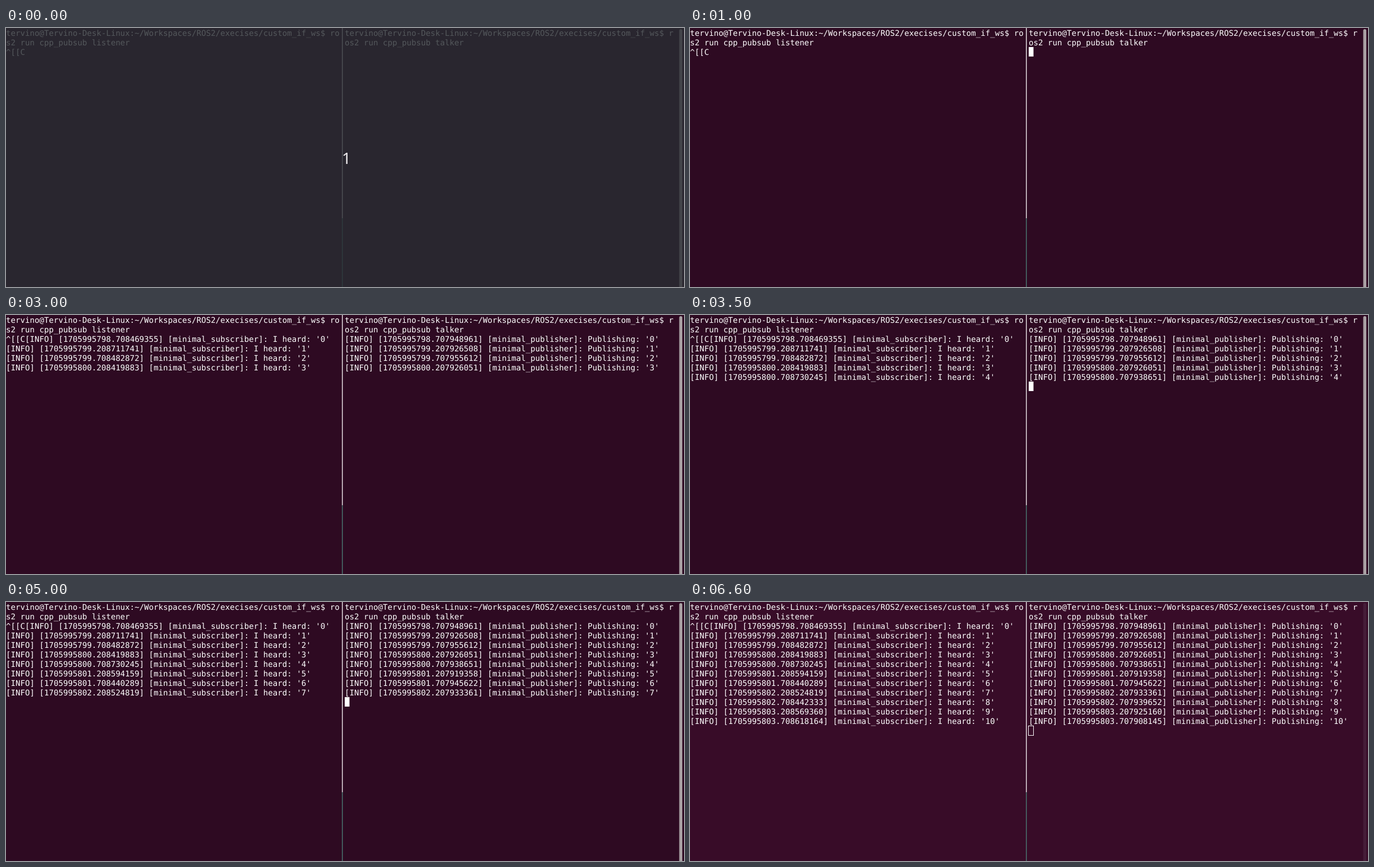
Recreate the animation shown at these times as an HTML page with a canvas. Size 1209 by 463 pixels, loop 6700 ms.

```html
<!DOCTYPE html>
<html lang="en">
<head>
<meta charset="utf-8">
<title>Publisher and subscriber</title>
<style>
html, body { margin: 0; width: 100%; height: 100%; overflow: hidden; background: #2e0a22; }
canvas { display: block; }
</style>
</head>
<body>
<canvas id="stage" width="1209" height="463"></canvas>
<script>
const ctx = document.getElementById('stage').getContext('2d');
const LOOP = 6700, CELL = 8.5, ROW = 17, RIGHT = 604;
const DIMMED_UNTIL = 100, FOCUS = 400, ENTER = 1000, FIRST_LOG = 1500, BLUR = 6600;
const LOG_STEP = 500, BLINK = 600;
const PROMPT = 'tervino@Tervino-Desk-Linux:~/Workspaces/ROS2/execises/custom_if_ws$ ';

// Seeded pseudo-random number in 0..1
function noise(seed) {
  const v = Math.sin(seed * 12.9898) * 43758.5453;
  return v - Math.floor(v);
}

// Log stamp: one message every half second, plus a small jitter in nanoseconds
function stamp(i, base, spread) {
  const nanos = base + i * 5e8 + Math.floor(noise(i + base % 97) * spread);
  const fraction = String(nanos % 1e9).padStart(9, '0');
  return `${1705995798 + Math.floor(nanos / 1e9)}.${fraction}`;
}

const heard = i =>
  `[INFO] [${stamp(i, 708400000, 450000)}] [minimal_subscriber]: I heard: '${i}'`;
const sent = i =>
  `[INFO] [${stamp(i, 707900000, 60000)}] [minimal_publisher]: Publishing: '${i}'`;

function rect(color, x, y, w, h) {
  ctx.fillStyle = color;
  ctx.fillRect(x, y, w, h);
}

function write(text, x, row) {
  ctx.fillText(text, x, row * ROW + 14);
}

function drawText(count) {
  ctx.font = '14.118px "DejaVu Sans Mono", monospace';
  ctx.textRendering = 'geometricPrecision';
  ctx.textAlign = 'left';
  ctx.fillStyle = '#fff';
  write(PROMPT + 'ro', 0, 0);
  write('s2 run cpp_pubsub listener', 0, 1);
  write('^[[C', 0, 2);
  write(PROMPT + 'r', RIGHT, 0);
  write('os2 run cpp_pubsub talker', RIGHT, 1);
  for (let i = 0; i < count; i++) {
    write(heard(i), i ? 0 : 4 * CELL, i + 2);
    write(sent(i), RIGHT, i + 2);
  }
}

function cursorLit(t) {
  if (t < ENTER) return t >= FOCUS;
  return (t - FIRST_LOG + BLINK) % (2 * BLINK) < BLINK;
}

function drawCursor(t, count) {
  const typed = t < ENTER;
  const x = typed ? RIGHT + 25 * CELL : RIGHT;
  const y = (typed ? 1 : count + 2) * ROW;
  if (t >= BLUR) {
    ctx.strokeStyle = '#fff';
    ctx.lineWidth = 1;
    ctx.strokeRect(x - 0.5, y + 0.5, 9, ROW);
  } else if (cursorLit(t)) {
    rect('#fff', x, y, CELL, ROW);
  }
}

function drawFrame(blurred) {
  rect('#e6dfe3', 599, 0, 1.5, 340);
  rect('#4a7570', 599, 340, 1.5, 123);
  ctx.fillStyle = blurred ? '#451d38' : '#a9a1a4';
  ctx.beginPath();
  ctx.roundRect(1200.5, 2, 5.5, 470, 2.75);
  ctx.fill();
}

function drawCountdown() {
  rect('rgba(40,45,50,.8)', 0, 0, 1209, 463);
  ctx.font = '28px "Noto Sans", sans-serif';
  ctx.textAlign = 'center';
  ctx.fillStyle = '#ece9ec';
  ctx.fillText('1', 607, 243);
}

function draw(now) {
  const t = now % LOOP;
  const blurred = t >= BLUR;
  const count = Math.max(0, Math.floor((t - FIRST_LOG) / LOG_STEP) + 1);
  rect(blurred ? '#380c28' : '#2e0a22', 0, 0, 1209, 463);
  drawText(count);
  drawCursor(t, count);
  drawFrame(blurred);
  if (t < DIMMED_UNTIL) drawCountdown();
}

const start = performance.now();
function tick(now) {
  draw(Math.max(0, now - start));
  requestAnimationFrame(tick);
}
draw(0);
requestAnimationFrame(tick);
</script>
</body>
</html>
```
